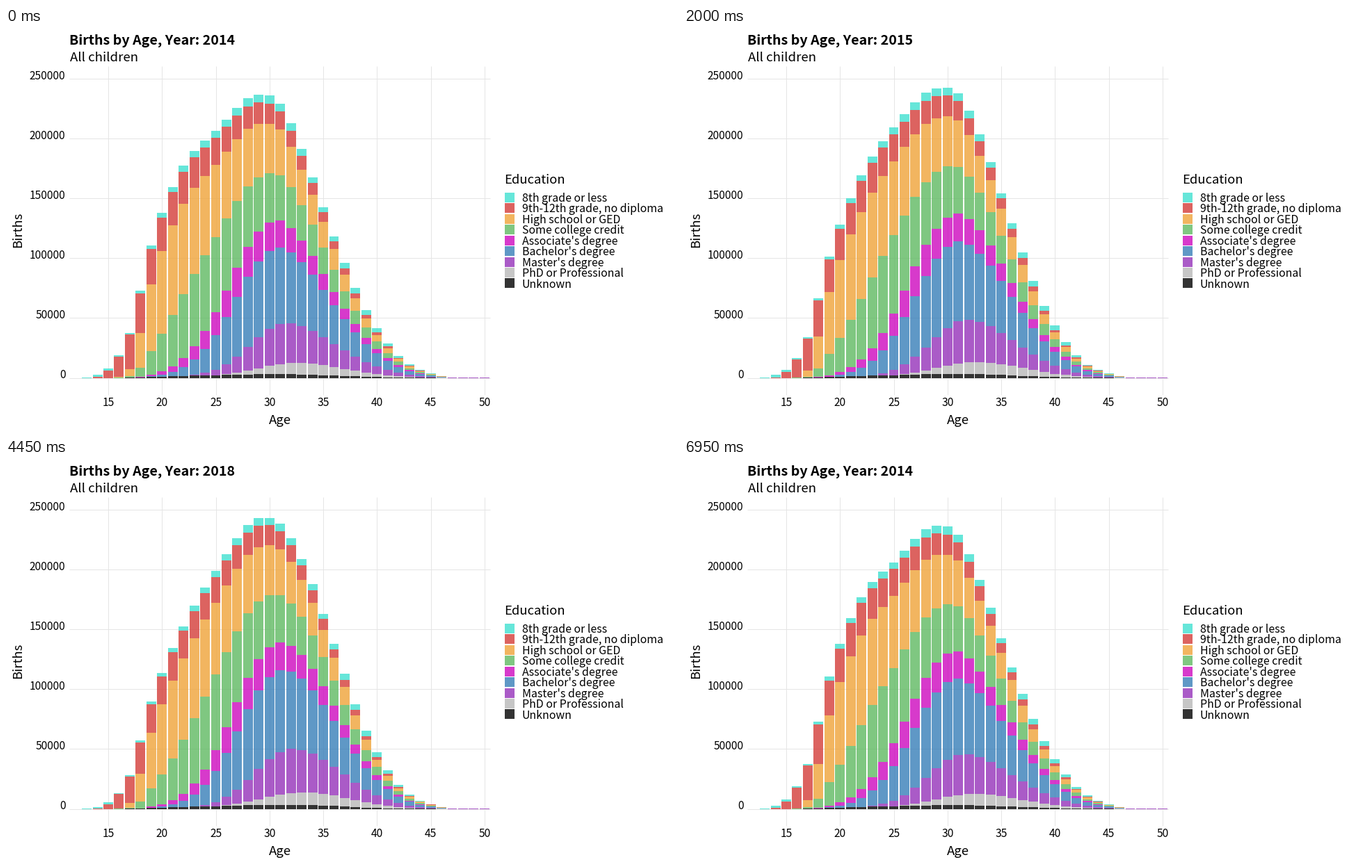
A matplotlib script for the animation above (7 s loop, 966 by 580 pixels).

```python
import numpy as np
import matplotlib.pyplot as plt
from matplotlib.animation import FuncAnimation
from matplotlib.collections import PolyCollection
from matplotlib.patches import Rectangle

W, H, DPI = 966, 580, 100
FRAMES, INTERVAL = 140, 50
FONT = "Noto Sans CJK JP"
GRID = "#E5E5E5"
ALPHA = 0.8

YEARS = np.arange(2014, 2020)
AGES = np.arange(13, 51)

# From the bottom of the stack: name, colour, then the share of mothers with
# this level or a higher one as a logistic in age: ceiling, midpoint, width
LEVELS = [
    ("Unknown", "#000000", 0.03, 33, 15),
    ("PhD or Professional", "#B8B8B8", 0.085, 30, 2.6),
    ("Master's degree", "#9532BA", 0.246, 28.4, 1.85),
    ("Bachelor's degree", "#377EB8", 0.524, 26.4, 2.0),
    ("Associate's degree", "#CE08BE", 0.618, 25.6, 2.1),
    ("Some college credit", "#5FB962", 0.775, 21.9, 3.0),
    ("High school or GED", "#EFA338", 0.922, 12, 4.8),
    ("9th-12th grade, no diploma", "#D43C38", 0.972, 14.4, 0.45),
    ("8th grade or less", "#40E0D0", 1, 0, 1),
]

# Key points of the outline: age, thousands of births in the key years
KEY_YEARS = [2014, 2016, 2019]
OUTLINE = np.array([
    (13, 0.4, 0.3, 0), (15, 8, 6.4, 4.5), (17, 37.7, 31.8, 24.7),
    (19, 110.5, 96.5, 83.5), (22, 177, 164.5, 142.5), (25, 206, 210.5, 188.5),
    (29, 236.5, 244.5, 241), (31, 229, 242, 235), (33, 191, 210, 207.5),
    (36, 118, 135, 140), (39, 56.7, 62.3, 67.8), (42, 18.5, 19, 21),
    (46, 1.6, 1.6, 1.6), (50, 0.5, 0.5, 0.5),
])

# Start frame and length in frames of each change of year
MOVES = [(12, 12), (36, 12), (60, 12), (84, 11), (108, 10), (130, 11)]


def logistic(x, mid, width):
    return 1 / (1 + np.exp(-(x - mid) / width))


def spline(x, xs, ys):
    """Cubic Hermite curve through the points."""
    slope = np.gradient(ys, xs)
    i = np.clip(np.searchsorted(xs, x, "right") - 1, 0, len(xs) - 2)
    h = xs[i + 1] - xs[i]
    t = (x - xs[i]) / h
    return ((1 + 2 * t) * (1 - t) ** 2 * ys[i]
            + t * (1 - t) ** 2 * h * slope[i]
            + t ** 2 * (3 - 2 * t) * ys[i + 1]
            + t ** 2 * (t - 1) * h * slope[i + 1])


def total_births(year):
    points = [np.interp(year, KEY_YEARS, row[1:]) for row in OUTLINE]
    return np.maximum(spline(AGES, OUTLINE[:, 0], np.array(points)), 0.4)


def shares(year):
    """Cumulative share of every level but the last, one column per age."""
    p = (year - YEARS[0]) / (YEARS[-1] - YEARS[0])
    graduated = logistic(AGES, 17.5, 0.52)
    late_dip = 1 - 0.0125 * np.clip(AGES - 35.5, 0, 5)
    rows = []
    for name, _, top, mid, width in LEVELS[:-1]:
        # Over the years the ceilings rise and the curves move to later ages
        top += 0.11 * p * top * (1 - top)
        row = top * logistic(AGES, mid * (1 + 0.02 * p), width) * late_dip
        rows.append(row if name.startswith("9th") else row * graduated)
    return np.maximum.accumulate(rows, axis=0)


def stack_edges(year):
    flat = np.ones(len(AGES))
    return np.vstack([0 * flat, shares(year), flat]) * total_births(year)


def x_of(age):
    return 147.0 + 15.453 * (age - 15)


def y_of(thousands):
    return 503.6 - 1.724 * thousands


def bar_verts(edges):
    low, high = y_of(edges[:-1]), y_of(edges[1:])
    left = np.broadcast_to(x_of(AGES - 0.45), low.shape)
    right = np.broadcast_to(x_of(AGES + 0.45), low.shape)
    corners = [(left, low), (right, low), (right, high), (left, high)]
    quads = np.stack([np.stack(c, axis=-1) for c in corners], axis=-2)
    return quads.reshape(-1, 4, 2)


def ease(t):
    return 4 * t ** 3 if t < 0.5 else 1 - 4 * (1 - t) ** 3


def state_at(frame):
    """Current year index, next year index and linear progress."""
    for n, (start, length) in enumerate(MOVES):
        if frame < start:
            return n, n, 0.0
        if frame < start + length:
            return n, (n + 1) % len(YEARS), (frame - start + 1) / length
    return 0, 0, 0.0


EDGES = [stack_edges(year) for year in YEARS]

fig = plt.figure(figsize=(W / DPI, H / DPI), dpi=DPI, facecolor="white")
ax = fig.add_axes([0, 0, 1, 1])
ax.set_xlim(0, W)
ax.set_ylim(H, 0)
ax.axis("off")


def label(x, y, text, px, **kw):
    return ax.text(x, y, text, fontsize=px * 72 / DPI, family=FONT, color="black",
                   **{"va": "baseline", **kw})


def grid_line(xs, ys):
    ax.plot(xs, ys, color=GRID, lw=72 / DPI, solid_capstyle="butt", zorder=1)


for births in range(0, 251, 50):
    y = y_of(births)
    grid_line([91, 696], [y, y])
    label(85.5, y + 0.9, str(births * 1000), 15.6, ha="right")
for age in range(15, 51, 5):
    x = x_of(age)
    grid_line([x, x], [55, 528])
    label(x, 544.5, str(age), 15.6, ha="center")

title = label(91.3, 24.3, "", 19.6, weight="bold")
label(91.5, 47.5, "All children", 18.6)
label(394, 569.5, "Age", 18.5, ha="center")
label(26, 290.5, "Births", 18.5, rotation=90, ha="right", va="center")

label(716, 224, "Education", 18.4)
for row, (name, color, *_) in enumerate(reversed(LEVELS)):
    top = 236.8 + 15.45 * row
    ax.add_patch(Rectangle((717, top), 14, 14, fc=color, alpha=ALPHA, lw=0))
    label(741.5, top + 13.2, name, 15.9)

colors = [level[1] for level in LEVELS]
bars = PolyCollection(bar_verts(EDGES[0]), facecolors=np.repeat(colors, len(AGES)),
                      edgecolors="none", linewidths=0, alpha=ALPHA,
                      antialiaseds=False, zorder=2)
bars.set_snap(True)
ax.add_collection(bars, autolim=False)


def update(frame):
    now, after, t = state_at(frame)
    k = ease(t)
    bars.set_verts(bar_verts((1 - k) * EDGES[now] + k * EDGES[after]))
    title.set_text(f"Births by Age, Year: {YEARS[after if t > 0.5 else now]}")
    return bars, title


anim = FuncAnimation(fig, update, frames=FRAMES, interval=INTERVAL, repeat=True)
plt.show()
```
